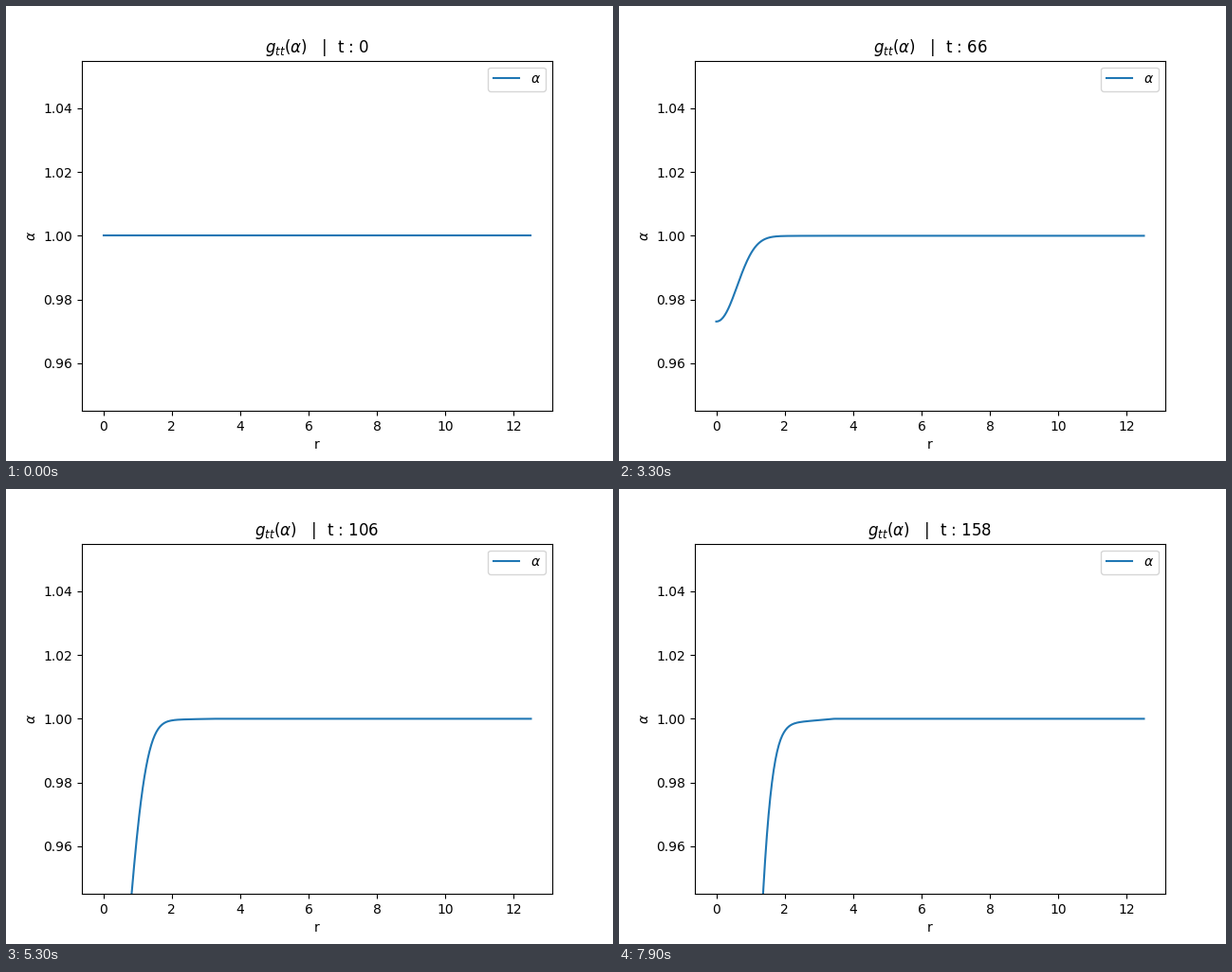
These frames come from a looping animation (640x480 px, 8 s). A matplotlib script:

```python
import numpy as np
import matplotlib.pyplot as plt
from matplotlib.animation import FuncAnimation

FRAMES, INTERVAL = 80, 100
STEP = 2              # time units per frame
UNIT = 1 / 3360       # lapse per pixel of plot height

r = np.linspace(0, 12.5, 500)


def lapse(t):
    """Collapsing lapse: a deepening central well plus a faint outer shelf."""
    d = t - 50
    depth = 6.514e-6 * t**4 / (1 + 8.47e-5 * t**2)
    width = 0.79 + 0.0016 * d + 6.3e-6 * d**2
    power = 2.1 + 0.0033 * d
    well = depth * np.exp(-(r / width) ** power)

    edge = 3.1 + 0.35 * (t - 94) / 64
    shelf = 4.6 * (t / 158) ** 4 * np.clip((edge - r) / (edge - 2), 0, 1)
    return 1 - UNIT * (well + shelf)


fig, ax = plt.subplots(figsize=(6.4, 4.8), dpi=100)
line, = ax.plot(r, np.ones_like(r), label=r"$\alpha$")
ax.set_xlim(-0.625, 13.125)
ax.set_ylim(0.945, 1.055)
ax.set_xlabel("r")
ax.set_ylabel(r"$\alpha$")
ax.legend(loc="upper right")
title = ax.set_title("")


def update(i):
    t = STEP * i
    line.set_ydata(lapse(t))
    title.set_text(rf"$g_{{tt}}(\alpha)$   |  t : {t}")
    return line, title


anim = FuncAnimation(fig, update, frames=FRAMES, interval=INTERVAL,
                     repeat=True, repeat_delay=0)
plt.show()
```
